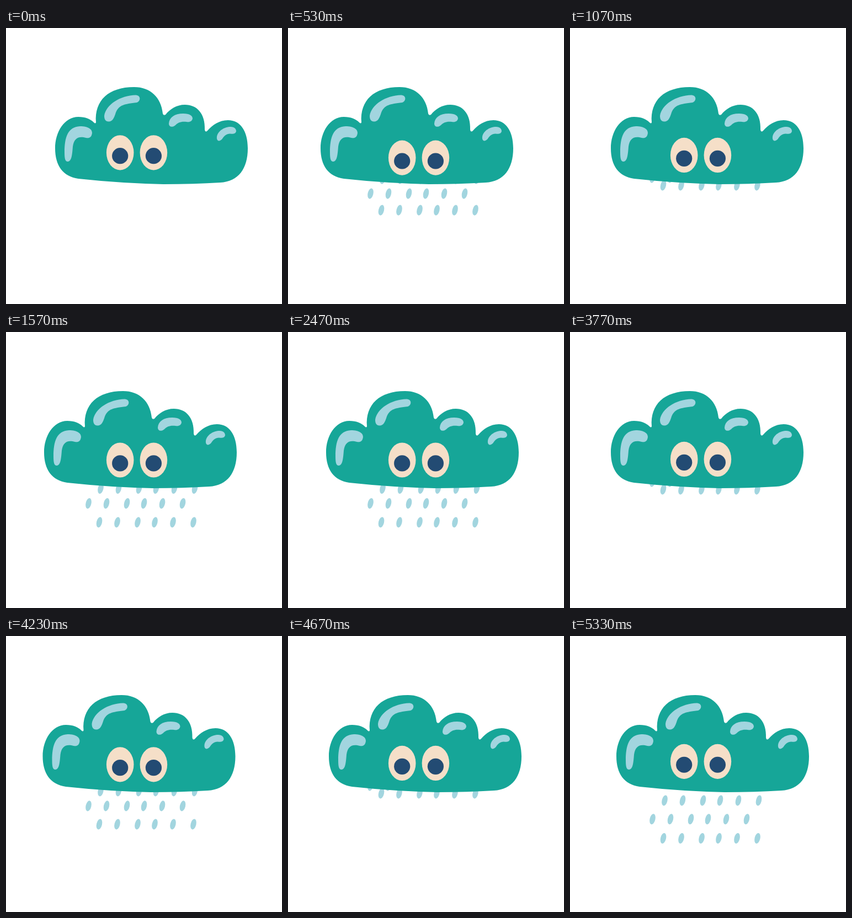
Recreate the animation shown at these times as an HTML page. Size 500x500 px, loop 5.36 s.

```html
<!DOCTYPE html>
<html lang="en">
<head>
<meta charset="utf-8">
<title>Rain cloud</title>
<style>
  html, body { margin: 0; width: 100%; height: 100%; overflow: hidden; background: #fff; }
  svg { display: block; width: 100vw; height: 100vh; }
  .light { fill: #a2d5df; }
  .body { fill: #16a698; }
  .white { fill: #f5dfc8; }
  .pupil { fill: #234b73; }
</style>
</head>
<body>
<svg viewBox="0 0 500 500">
  <defs>
    <ellipse id="drop" class="light" rx="5" ry="9.7" transform="rotate(13)"/>
    <g id="eye">
      <ellipse class="white" cy="225.8" rx="24.8" ry="31.6"/>
      <circle class="pupil" cy="231.7" r="14.6"/>
    </g>
  </defs>
  <g id="rain"></g>
  <g id="cloud">
    <path class="body" d="M89 218C89 188 106 161 131 161C144 161 153 165 159 171Q162 174 163 171C160 131 186 107 232 107C262 107 281 126 284 155Q285 159 289 157C297 147 309 139 324 139C346 139 361 155 360 184Q361 190 365 186C374 176 386 167 402 167C425 167 438 187 438 218C438 255 421 278 388 280Q340 283 285 283Q205 281 131 273C103 269 89 249 89 218Z"/>
    <g class="light">
      <path d="M106 225C106 198 112 179 134 178C150 178 156 184 156 190C155 199 150 200 145 199C130 195 123 201 121 215C120 228 119 242 112 242C107 242 106 236 106 225Z"/>
      <path d="M178 159C181 139 207 122 235 121.5C245 122 244 133 237 135C214 138 205 139 199 153C196 163 193 169.500 186 169.500C180 169.500 178 165 178 159Z"/>
      <path d="M295 173C296 162 305 155 321 155C333 155 338 159 338 164C337 169 333 171 327 170C317 169 312 171 307 176C301 181 295 179 295 173Z"/>
      <path d="M382 197C384 186 396 179 407 179C414 179 417 183 417 187C416 192 411 192 406 191.500C399 192 396 195 393 199C388 207 381 206 382 197Z"/>
    </g>
  </g>
  <g id="eyes">
    <use href="#eye" x="206.700"/>
    <use href="#eye" x="267.400"/>
  </g>
</svg>
<script>
  const LOOP = 5360, FPS = 30, SWING = 27;
  const columns = [0, 32.5, 69.500, 100.500, 133.500, 170.500];
  // Each row: left edge, then [step, y] points of its fall
  const rows = [
    { x: 171.500, fall: [[0, 255], [14, 268], [20, 283.500], [25, 298], [26, 301]] },
    { x: 149.500, fall: [[0, 262], [5, 271], [20, 310.500], [22, 318], [24, 328], [26, 335.500]] },
    { x: 169, fall: [[0, 266], [5, 285], [16, 330], [22, 352], [24, 363], [26, 370]] }
  ];
  const byId = id => document.getElementById(id);
  const cloud = byId('cloud'), eyes = byId('eyes');

  function make(name, parent, attrs = {}) {
    const el = document.createElementNS('http://www.w3.org/2000/svg', name);
    for (const key in attrs) el.setAttribute(key, attrs[key]);
    return parent.appendChild(el);
  }

  function move(el, x, y) {
    el.setAttribute('transform', `translate(${x} ${y})`);
  }

  function along(points, t) {
    const i = Math.max(1, points.findIndex(p => p[0] >= t));
    const [t0, y0] = points[i - 1], [t1, y1] = points[i];
    return y0 + (y1 - y0) * (t - t0) / (t1 - t0);
  }

  for (const row of rows) {
    row.el = make('g', byId('rain'));
    for (const x of columns) make('use', row.el, { href: '#drop', x: row.x + x });
  }

  function draw(ms) {
    const step = Math.floor((ms % LOOP + 3.4) * FPS / 1000) % SWING;
    const near = Math.min(step, SWING - step);
    // The swing is steady, with a short quick stretch near the right end
    const shift = 2.5 * (near + Math.min(1, Math.max(0, (near - 3) / 2)));
    move(cloud, -shift, 0);
    move(eyes, 0, shift * 0.31);
    for (const row of rows) move(row.el, 0, along(row.fall, step));
  }

  const start = performance.now();
  function tick() {
    draw(performance.now() - start);
    requestAnimationFrame(tick);
  }
  draw(0);
  requestAnimationFrame(tick);
</script>
</body>
</html>
```
